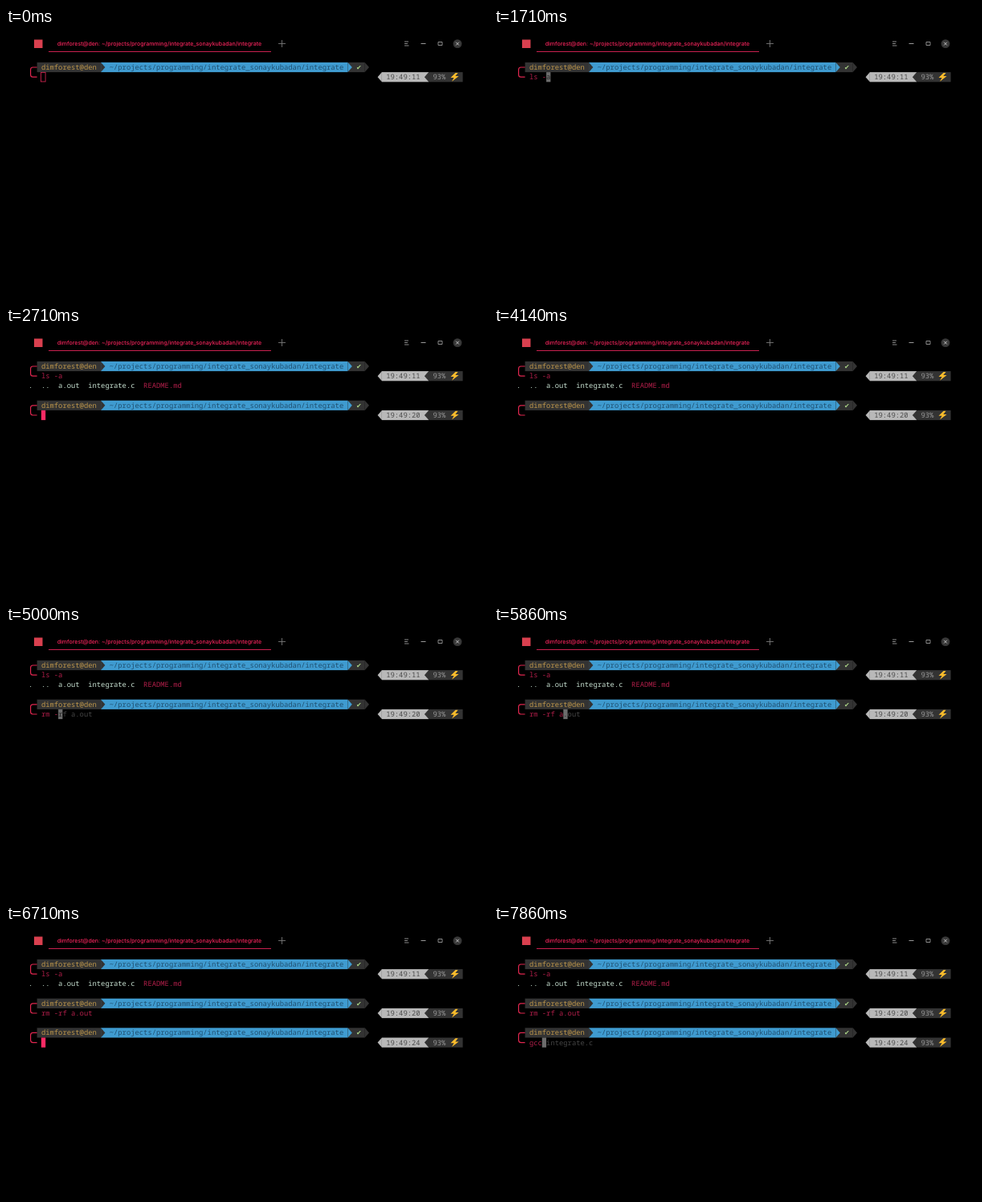
These frames come from a looping animation (600 by 338 pixels, 8 s). An HTML page with a canvas:

```html
<!DOCTYPE html>
<html lang="en">
<head>
<meta charset="utf-8">
<title>Terminal</title>
<style>
  html, body { margin: 0; width: 100%; height: 100%; overflow: hidden; background: #000; }
  canvas { display: block; width: 600px; height: 338px; }
</style>
</head>
<body>
<canvas></canvas>
<script>
const LOOP = 8000, BLINK = 570, FOCUS = 710, OUTPUT = 2570;
const CELL = 5.3, ROW = 12.2, LEFT = 28, TOP = 42.9;
const USER = 'dimforest@den';
const PATH = '~/projects/programming/integrate_sonaykubadan/integrate';
const RED = '#b01e49', PINK = '#ff2a64', DARK = '#333', BLUE = '#3f9bd0', LIGHT = '#b9b9b9';
const MONO = '8.833px "Noto Sans Mono", monospace';

// One entry per prompt: when it appears, and when each key lands
const sessions = [
  { at: 0, row: 0, clock: '19:49:11', line: 'ls -a',
    keys: [1290, 1430, 1570, 1710, 2140], enter: 2430 },
  { at: 2710, row: 4, clock: '19:49:20', line: 'rm -rf a.out',
    keys: [4570, 4710, 4860, 5000, 5290, 5430, 5570, 5860, 6000, 6140, 6140, 6140], enter: 6430 },
  { at: 6710, row: 7, clock: '19:49:24', line: 'gcc integrate.c',
    keys: [7570, 7710, 7860], enter: Infinity }
];
const activity = [FOCUS + 10, ...sessions.flatMap(s => [...s.keys, s.enter])];

const canvas = document.querySelector('canvas');
const ctx = canvas.getContext('2d');
const ratio = window.devicePixelRatio || 1;
canvas.width = 600 * ratio;
canvas.height = 338 * ratio;
ctx.scale(ratio, ratio);
ctx.textRendering = 'geometricPrecision';

const colX = col => LEFT + col * CELL;
const rowY = row => TOP + row * ROW;

function text(str, col, row, color, font = MONO) {
  ctx.font = font;
  ctx.fillStyle = color;
  [...str].forEach((ch, i) => ctx.fillText(ch, colX(col + i), rowY(row) + 9.1));
}

function bar(from, to, row, color) {
  ctx.fillStyle = color;
  ctx.fillRect(colX(from), rowY(row), (to - from) * CELL, ROW);
}

function polygon(points, color) {
  ctx.fillStyle = color;
  ctx.beginPath();
  points.forEach(([x, y]) => ctx.lineTo(x, y));
  ctx.fill();
}

function arrow(base, tip, row, color) {
  const y = rowY(row);
  polygon([[colX(base), y], [colX(tip), y + ROW / 2], [colX(base), y + ROW]], color);
}

function stroke(d, color, width = 1) {
  ctx.strokeStyle = color;
  ctx.lineWidth = width;
  ctx.stroke(new Path2D(d));
}

function titleBar() {
  ctx.fillStyle = '#d9404f';
  ctx.fillRect(35, 14.5, 10.5, 10.5);
  ctx.font = '500 7px Inter, sans-serif';
  ctx.fillStyle = '#f5245c';
  ctx.fillText(`${USER}: ${PATH}`, 63.7, 22);
  stroke('M53 29.5H330', '#c9204f');
  stroke('M339 19.5h9M343.5 15v9', '#777', 0.9);
  stroke('M496 17h5M496 19.5h4M496 22h5.500', '#999', 0.9);
  stroke('M516.500 19.5h6', '#999');
  stroke('M538 17.500h5v4h-5z', '#999', 0.9);
  ctx.fillStyle = '#383838';
  ctx.beginPath();
  ctx.arc(562, 19.6, 5.4, 0, 7);
  ctx.fill();
  stroke('M560.1 17.700l3.800 3.800m0-3.800l-3.800 3.800', '#ccc', 0.9);
}

function prompt({ row, clock }) {
  const y = rowY(row) + ROW / 2, below = row + 1;
  bar(2, 17, row, DARK);
  bar(17, 75, row, BLUE);
  arrow(17, 18, row, DARK);
  bar(75, 79, row, DARK);
  arrow(75, 76, row, BLUE);
  arrow(79, 80, row, DARK);
  stroke(`M38.600 ${y}H33.500Q30.600 ${y} 30.600 ${y + 3}V${y + ROW - 3}Q30.600 ${y + ROW} 33.500 ${y + ROW}H38.600`, '#e0264f', 1.2);
  text(USER, 3, row, '#bd964b');
  text(PATH, 19, row, '#1f4f70');
  text('✔', 77, row, '#a9d185', '8px "DejaVu Sans", sans-serif');

  arrow(83, 82, below, LIGHT);
  bar(83, 94, below, LIGHT);
  bar(94, 102, below, DARK);
  arrow(94, 93, below, DARK);
  text(clock, 84, below, '#4c4c4c');
  text('93%', 95, below, '#999');
  const top = rowY(below);
  polygon([[559.5, 0.8], [553.5, 6.8], [557.6, 6.8], [555, 11.6], [563.6, 5], [559.3, 5], [562.6, 0.8]]
    .map(([x, dy]) => [x, top + dy]), '#fdbd2c');
}

function listing() {
  const pale = '#c6dfd0';
  text('.  ..', 0, 2, pale);
  text('a.out', 7, 2, pale);
  text('integrate.c', 14, 2, pale);
  text('README.md', 27, 2, RED);
}

function cursor(col, row, t, ghost) {
  if (t < FOCUS) {
    ctx.strokeStyle = '#c8244e';
    ctx.lineWidth = 0.9;
    ctx.strokeRect(colX(col) - 0.4, rowY(row) + 0.4, CELL + 0.3, ROW - 0.8);
    return;
  }
  const last = Math.max(...activity.filter((a, i) => i === 0 || a <= t));
  if ((t - last) % (2 * BLINK) >= BLINK) return;
  bar(col, col + 1, row, ghost ? '#6c6c6c' : PINK);
  if (ghost) text(ghost[0], col, row, '#242424');
}

function draw(t) {
  ctx.fillStyle = '#000';
  ctx.fillRect(0, 0, 600, 338);
  titleBar();
  if (t >= OUTPUT) listing();
  const shown = sessions.filter(s => t >= s.at);
  for (const s of shown) {
    prompt(s);
    const typed = s.keys.filter(k => t >= k).length;
    const ghost = typed ? s.line.slice(typed) : '';
    text(s.line.slice(0, typed), 3, s.row + 1, RED);
    text(ghost, 3 + typed, s.row + 1, '#444');
    if (s !== shown.at(-1)) continue;
    if (t < s.enter) cursor(3 + typed, s.row + 1, t, ghost);
    else cursor(0, s.row === 0 && t >= OUTPUT ? 3 : s.row + 2, t, '');
  }
}

function tick() {
  draw(performance.now() % LOOP);
  requestAnimationFrame(tick);
}
tick();
</script>
</body>
</html>
```
